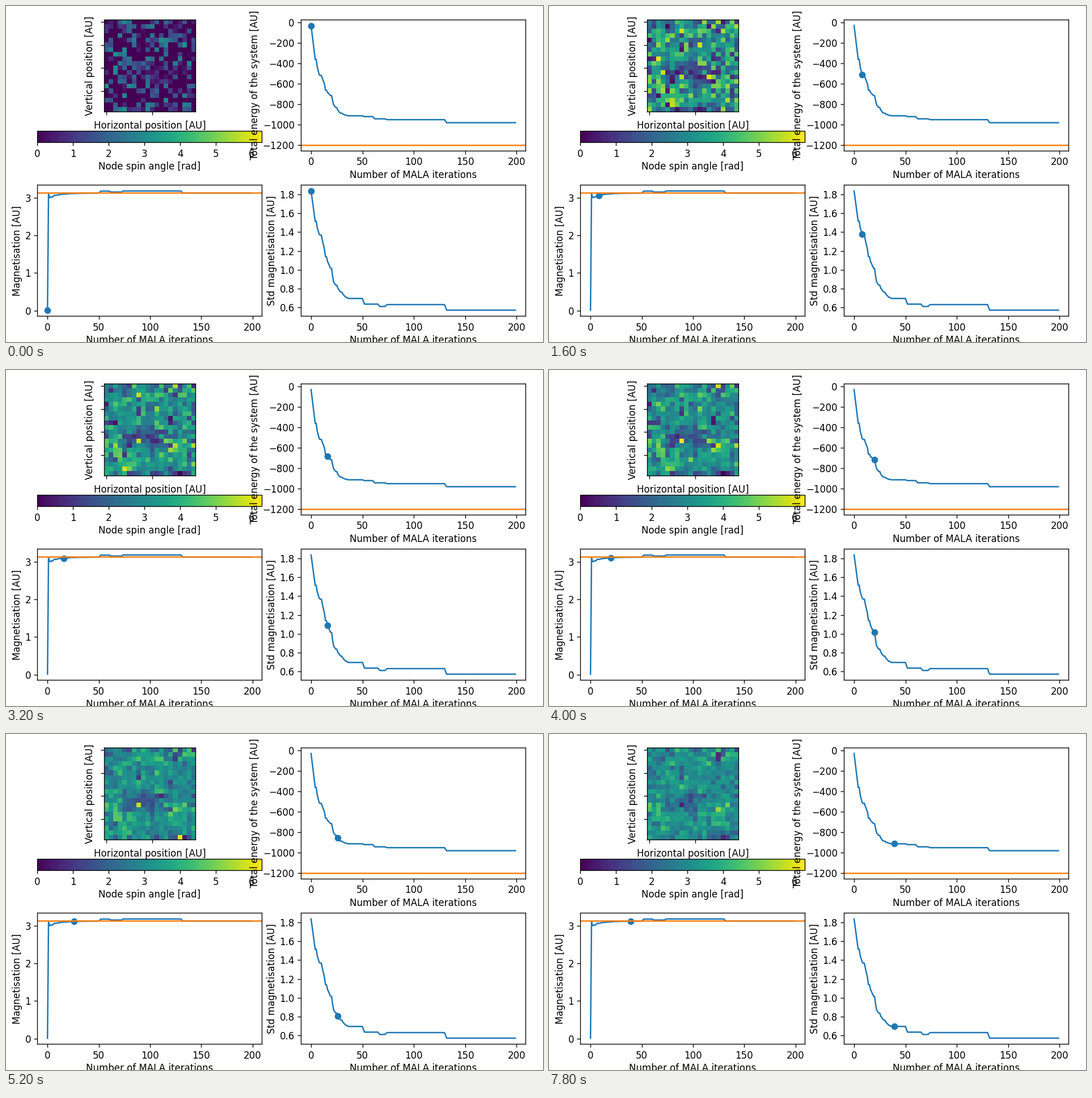
A matplotlib script for the animation above (8 s loop, 947 by 592 pixels).

```python
import numpy as np
import matplotlib.pyplot as plt
from matplotlib.animation import FuncAnimation
from matplotlib.ticker import MultipleLocator

W, H, DPI = 947, 592, 120
FRAMES, STEP_MS = 40, 200
N = 20
TAU = 2 * np.pi
ITERS = np.arange(200)

rng = np.random.default_rng(7)

# Every fifth proposal is rejected, so the chain stands still there.
rejected = (ITERS % 5 == 0) & (ITERS > 0)
held = ITERS - rejected


def late_jumps(*jumps):
    """Sum of short ramps, each given as (iteration, height)."""
    return sum(h * np.clip((ITERS - t + 1) / 2, 0, 1) for t, h in jumps)


KEYS = (0, 4, 8, 10, 13, 14, 20, 22, 28, 35)
energy = np.interp(held, KEYS, (-28, -360, -513, -522, -600, -663, -727,
                                -808, -885, -915))
energy += late_jumps((51, -8), (61, -22), (73, -8), (131, -30))

spread = np.interp(held, KEYS, (1.836, 1.515, 1.376, 1.36, 1.219, 1.14, .991,
                                .87, .775, .697))
spread += late_jumps((51, -.06), (66, -.025), (73, .02), (131, -.059))

wobble = .02 * rng.normal(size=ITERS.size) * (ITERS < 35)
magnet = 3.118 + (wobble - .14) * np.exp(-held / 9)
magnet += late_jumps((51, .055), (61, -.025), (73, .028), (131, -.058))
magnet[:2] = .015, 3.1


def spot(row, col, radius):
    """Soft round weight on the periodic lattice."""
    r, c = np.indices((N, N))
    dr = (r - row + N / 2) % N - N / 2
    dc = (c - col + N / 2) % N - N / 2
    return np.exp(-(dr ** 2 + dc ** 2) / radius ** 2)


def simulate(eps=.025):
    """Langevin steps of an XY lattice with a few slow vortex spots."""
    top, middle, edge = spot(.3, 15.5, 1.6), spot(10, 11, 1.9), spot(12, 0, 1)
    slow = np.clip(top + middle + edge, 0, 1)
    spins = rng.uniform(-np.pi, np.pi, (N, N)) * (1 - slow)
    spins += .3 * (top + middle - edge)
    fields = [spins]
    for n in range(1, FRAMES):
        if not rejected[n] and n <= KEYS[-1] + 1:
            force = np.sin(np.pi - spins)
            for shift, axis in ((1, 0), (-1, 0), (1, 1), (-1, 1)):
                force += np.sin(np.roll(spins, shift, axis) - spins)
            noise = rng.normal(0, np.sqrt(2 * eps), (N, N))
            spins = (spins + eps * force * (1 - .8 * slow) + noise) % TAU
            dev = spins - np.pi
            spins = np.pi + dev * min(1, spread[n] / dev.std())
        fields.append(spins)
    return fields


fields = simulate()
fig = plt.figure(figsize=(W / DPI, H / DPI), dpi=DPI, facecolor="white")
plt.rcParams.update({"axes.labelpad": 2.9, "xtick.major.pad": 3.2,
                     "ytick.major.pad": 3.2})


def panel(x0, y0, x1, y1):
    return fig.add_axes([x0 / W, 1 - y1 / H, (x1 - x0) / W, (y1 - y0) / H])


def trace(ax, data, label, step, level=None):
    ax.plot(ITERS, data, color="C0")
    if level is not None:
        ax.axhline(level, color="C1")
    ax.set(ylabel=label, xlabel="Number of MALA iterations")
    ax.xaxis.set_major_locator(MultipleLocator(50))
    ax.yaxis.set_major_locator(MultipleLocator(step))
    dot = ax.scatter([0], [data[0]], color="C0")
    ax.set_xlim(-9.95, 208.95)
    return dot, data


ax = panel(172.8, 24, 334.4, 186)
image = ax.imshow(fields[0], cmap="viridis", vmin=0, vmax=TAU,
                  aspect="auto", interpolation="nearest")
ax.set_xticks([0, 10], ["", ""])
ax.set_yticks([0, 5, 10, 15], [""] * 4)
ax.set(xlabel="Horizontal position [AU]", ylabel="Vertical position [AU]")
fig.colorbar(image, cax=panel(55.2, 220.4, 451, 240.4),
             orientation="horizontal", label="Node spin angle [rad]",
             ticks=range(7))

dots = [
    trace(panel(520, 24, 916.3, 255), energy,
          "Total energy of the system [AU]", 200, -1200),
    trace(panel(55.2, 315.4, 451, 546.4), magnet,
          "Magnetisation [AU]", 1, 3.125),
    trace(panel(520, 315.4, 916.3, 546.4), spread,
          "Std magnetisation [AU]", .2),
]


def update(n):
    image.set_data(fields[n])
    for dot, data in dots:
        dot.set_offsets([(n, data[n])])
    return [image] + [dot for dot, _ in dots]


anim = FuncAnimation(fig, update, frames=FRAMES, interval=STEP_MS,
                     repeat=True, repeat_delay=0)
plt.show()
```
